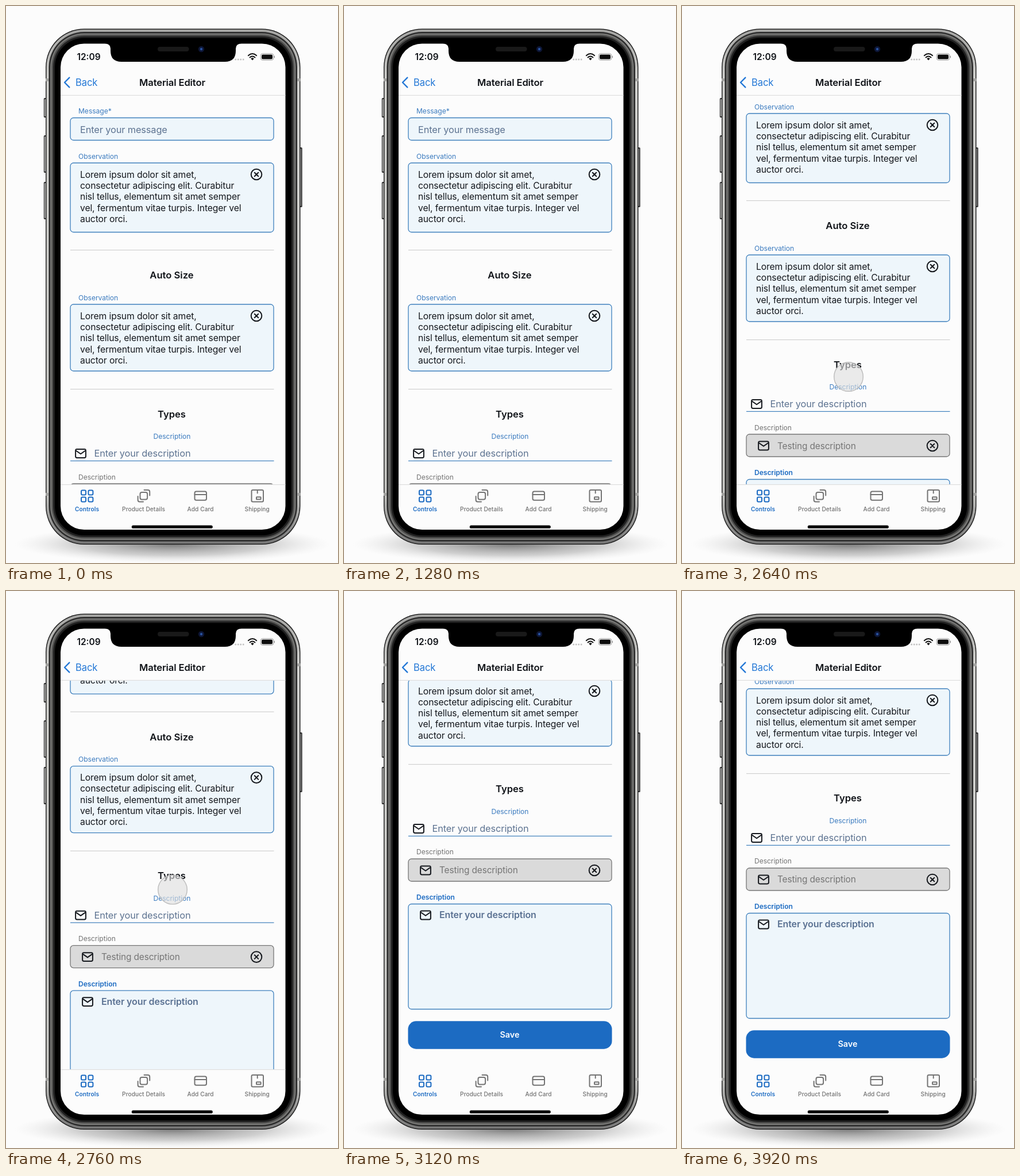
An HTML page for the animation above (7000 ms loop, 578x969 px).

```html
<!DOCTYPE html>
<html lang="en">
<head>
<meta charset="utf-8">
<title>Material Editor</title>
<style>
  html, body { margin: 0; width: 100%; height: 100%; overflow: hidden; background: #fcfcfc; }
  svg { display: block; width: 100%; height: 100%; }
  text { font-family: Inter, Roboto, sans-serif; white-space: pre; }
  .mid { text-anchor: middle; }
  .label { font-size: 12.1px; letter-spacing: -.05px; fill: #3b7bbf; }
  .body { font-size: 15.7px; letter-spacing: -.12px; fill: #14171c; }
  .hint { font-size: 16.35px; letter-spacing: -.12px; fill: #5d7391; }
  .off { font-size: 15.4px; letter-spacing: -.12px; fill: #757575; }
  .strong { font-size: 16px; font-weight: 600; letter-spacing: -.12px; fill: #5a7192; }
  .head { font-size: 16.6px; font-weight: 600; fill: #101318; }
  .nav { font-size: 16.6px; letter-spacing: -.12px; fill: #2478d6; }
  .tab { font-size: 10.1px; font-weight: 500; letter-spacing: .1px; fill: #707070; }
  .line { fill: none; stroke-linecap: round; stroke-linejoin: round; stroke-width: 2; }
</style>
</head>
<body>
<svg id="stage" viewBox="0 0 578 969" preserveAspectRatio="none"></svg>
<script>
const BLUE = '#1c6bc2', EDGE = '#3f80bd', GREY = '#747474';
const LOOP = 7000, STEP = 40, END = 349;

const rect = (x, y, w, h, r, fill, more = '') =>
  `<rect x="${x}" y="${y}" width="${w}" height="${h}" rx="${r}" fill="${fill}" ${more}/>`;
const text = (x, y, cls, s, more = '') => `<text x="${x}" y="${y}" class="${cls}" ${more}>${s}</text>`;
const line = (d, stroke, more = '') => `<path d="${d}" class="line" stroke="${stroke}" ${more}/>`;
const rule = (y, color, x = 112, w = 354.5) => rect(x, y, w, 1.2, 0, color);
const field = (y, h, fill = '#eef6fb', edge = EDGE) =>
  rect(112, y, 354, h, 5.5, fill, `stroke="${edge}" stroke-width="1.3"`);
const clear = y => `<circle cx="436" cy="${y}" r="9.3" class="line" stroke="#15181d"/>` +
  line(`M432.7 ${y - 3.3}l6.6 6.6m0 -6.6l-6.6 6.6`, '#15181d');
const mail = (x, y) => rect(x - 8.9, y - 7.4, 17.8, 14.8, 2.4, 'none', 'stroke="#15181d" stroke-width="2"') +
  line(`M${x - 7.5} ${y - 4.5}l7.5 5.3l7.5 -5.3`, '#15181d');

const lorem = ['Lorem ipsum dolor sit amet,', 'consectetur adipiscing elit. Curabitur',
  'nisl tellus, elementum sit amet semper', 'vel, fermentum vitae turpis. Integer vel', 'auctor orci.'];
const observation = (y, h) => text(126, y - 7.5, 'label', 'Observation') + field(y, h) +
  lorem.map((s, i) => text(129, y + 25.6 + i * 19.3, 'body', s)).join('') + clear(y + 20);

function phone() {
  const shell = (inset, fill) =>
    rect(69 + inset, 39.5 + inset, 443.5 - 2 * inset, 897.5 - 2 * inset, 67 - inset, fill);
  const key = (x, y, h) => rect(x, y, 6, h, 1.5, '#333') + rect(x + 1.3, y + 2, 2.6, h - 4, 1, '#b9b9b7');
  const bands = [126, 847].map(y => rect(69, y, 6, 5, 0, '#a3a3a1') + rect(506.5, y, 6, 5, 0, '#a3a3a1')).join('');
  return '<ellipse cx="290" cy="936" rx="275" ry="33" fill="url(#shadow)"/>' +
    key(65.8, 160, 34) + key(65.8, 225, 65) + key(65.8, 306, 65) + key(509.7, 246, 104) +
    shell(0, '#222') + shell(1.5, 'url(#metal)') + bands +
    shell(5.5, '#2b2b2b') + shell(8, '#777775') + shell(10.5, '#50504f') + shell(13, '#202020') + shell(16, '#000') +
    rect(95, 65.5, 391.5, 845.5, 41, '#fcfcfc');
}

function notch() {
  return '<path d="M172 65H410Q400 66 400 74V78Q400 97 381 97H201Q182 97 182 78V74Q182 66 172 65Z"/>' +
    rect(264, 71, 54.5, 8, 4, '#191919') +
    '<circle cx="340" cy="75" r="5.2" fill="#0d1636"/><circle cx="340" cy="75" r="2.2" fill="#28519c"/>';
}

function statusBar() {
  const dots = [0, 1, 2, 3].map(i => `<circle cx="${399.7 + i * 4.5}" cy="93" r="1.5" fill="#c2c2c2"/>`).join('');
  return text(144, 94, 'head mid', '12:09', 'style="font-size:15.4px"') + dots +
    line('M421.8 86.2Q429 79.8 436.2 86.2M424.5 89.4Q429 85.6 433.5 89.4', '#111', 'stroke-width="2.3" stroke-linecap="butt"') +
    '<path d="M426.2 91.5Q429 89.2 431.8 91.5L429 94.5Z" fill="#111"/>' +
    rect(443.3, 82.8, 22.4, 11.4, 3.4, 'none', 'stroke="#999"') + rect(445, 84.5, 19, 8, 2, '#0c0c0c') +
    rect(466.6, 86.5, 1.4, 4, .7, '#999');
}

function navBar() {
  return line('M110.3 124.6L102 133L110.3 141.4', '#2478d6', 'style="stroke-width:2.4"') +
    text(121, 139, 'nav', 'Back') +
    text(289.5, 139, 'head mid', 'Material Editor', 'letter-spacing="-.12"') +
    rule(154.8, '#dedede', 95, 391.5);
}

function content() {
  return text(126, 187, 'label', 'Message*') + field(194.5, 39) + text(129, 220.8, 'hint', 'Enter your message') +
    observation(273, 120.5) + rule(424, '#d0d0d0') +
    text(288.5, 474, 'head mid', 'Auto Size') + observation(519, 116) + rule(666, '#d0d0d0') +
    text(288.5, 715.5, 'head mid', 'Types') +
    text(289, 753, 'label mid', 'Description') + mail(130, 778.5) +
    text(153.5, 784, 'hint', 'Enter your description') + rule(790.8, EDGE) +
    text(126, 823.5, 'label', 'Description', 'style="fill:#747474"') + field(831, 39, '#dadada', '#777') +
    mail(142, 851) + text(166, 856.5, 'off', 'Testing description') + clear(851) +
    text(126, 902.3, 'label', 'Description', `style="font-weight:600;fill:${BLUE}"`) + field(909.5, 183) +
    mail(142, 929) + text(166, 934.5, 'strong', 'Enter your description') +
    rect(111.5, 1113.3, 355, 48.4, 14, BLUE) +
    text(288.5, 1142.3, 'head mid', 'Save', 'style="font-size:14.4px;fill:#fff"');
}

function tabBar() {
  const box = (x, y, w, h, r, c) => rect(x, y, w, h, r, 'none', `stroke="${c}" stroke-width="2"`);
  const grid = [131, 143.4].map(x => [842.4, 854.6].map(y => box(x, y, 8, 8, 2, BLUE)).join('')).join('');
  return grid + text(141, 878.5, 'tab mid', 'Controls', `style="font-weight:600;fill:${BLUE}"`) +
    box(233.5, 846, 12.6, 12.6, 3, GREY) +
    line('M240.5 842H247Q250.2 842 250.2 845.2V851.5M229.6 853V859.3Q229.6 862.5 232.8 862.5H239', GREY) +
    text(239.6, 878.5, 'tab mid', 'Product Details') +
    box(328.5, 844.5, 20.5, 15.2, 2.8, GREY) + line('M328.5 850H349', GREY) +
    text(338.6, 878.5, 'tab mid', 'Add Card') +
    box(427.5, 842, 20.5, 20.5, 2.2, GREY) + line('M437.7 842V847.5', GREY) + box(436, 854.3, 7.6, 4, .5, GREY) +
    text(437.2, 878.5, 'tab mid', 'Shipping') +
    rect(218.8, 903.6, 141, 5.2, 2.6, '#000');
}

const stage = document.getElementById('stage');
stage.innerHTML = `<defs>
  <clipPath id="view"><rect x="95" y="155.5" width="391.5" height="677"/></clipPath>
  <radialGradient id="shadow"><stop offset="0" stop-color="#777"/><stop offset=".6" stop-color="#aaa" stop-opacity=".55"/>
    <stop offset="1" stop-color="#ddd" stop-opacity="0"/></radialGradient>
  <linearGradient id="metal" x2="0" y2="1"><stop offset="0" stop-color="#a5a5a3"/><stop offset=".1" stop-color="#d2d2cf"/>
    <stop offset=".9" stop-color="#c6c6c3"/><stop offset="1" stop-color="#777"/></linearGradient>
  </defs>` + phone() + `<g clip-path="url(#view)"><g id="page">${content()}</g></g>` +
  notch() + statusBar() + navBar() + `<g id="edge">${rule(832, '#dedede', 95, 391.5)}</g>` + tabBar() +
  '<circle id="touch" cx="290" r="25.3" fill="#e0e0e0" fill-opacity=".62" stroke="#bcbcbc" stroke-width="1.4"/>';

const [page, edge, touch] = ['page', 'edge', 'touch'].map(id => document.getElementById(id));

// Drag speeds up, runs steadily to the end, then springs back past it.
const START = 2480, STEADY = 2640, HIT = 2886, SPEED = 1.07;
function scrollAt(t) {
  if (t < START) return 0;
  if (t < STEADY) return 86 * ((t - START) / (STEADY - START)) ** 2;
  if (t < HIT) return 86 + (t - STEADY) * SPEED;
  const s = t - HIT;
  return END + SPEED * s * Math.exp(-s * .01175);
}

function draw(now) {
  const t = Math.floor(now % LOOP / STEP) * STEP;
  const y = scrollAt(t);
  page.setAttribute('transform', `translate(0 ${-y.toFixed(2)})`);
  edge.setAttribute('opacity', y < END ? 1 : 0);
  touch.setAttribute('cy', 731 - y + 6 * Math.max(0, Math.min(1, (t - STEADY) / 240)));
  touch.setAttribute('opacity', t < START ? 0 : Math.max(0, Math.min(1, (t - START + STEP) / 80, (3000 - t) / 120)));
}

const begin = performance.now();
function tick() {
  draw(performance.now() - begin);
  requestAnimationFrame(tick);
}
tick();
</script>
</body>
</html>
```
